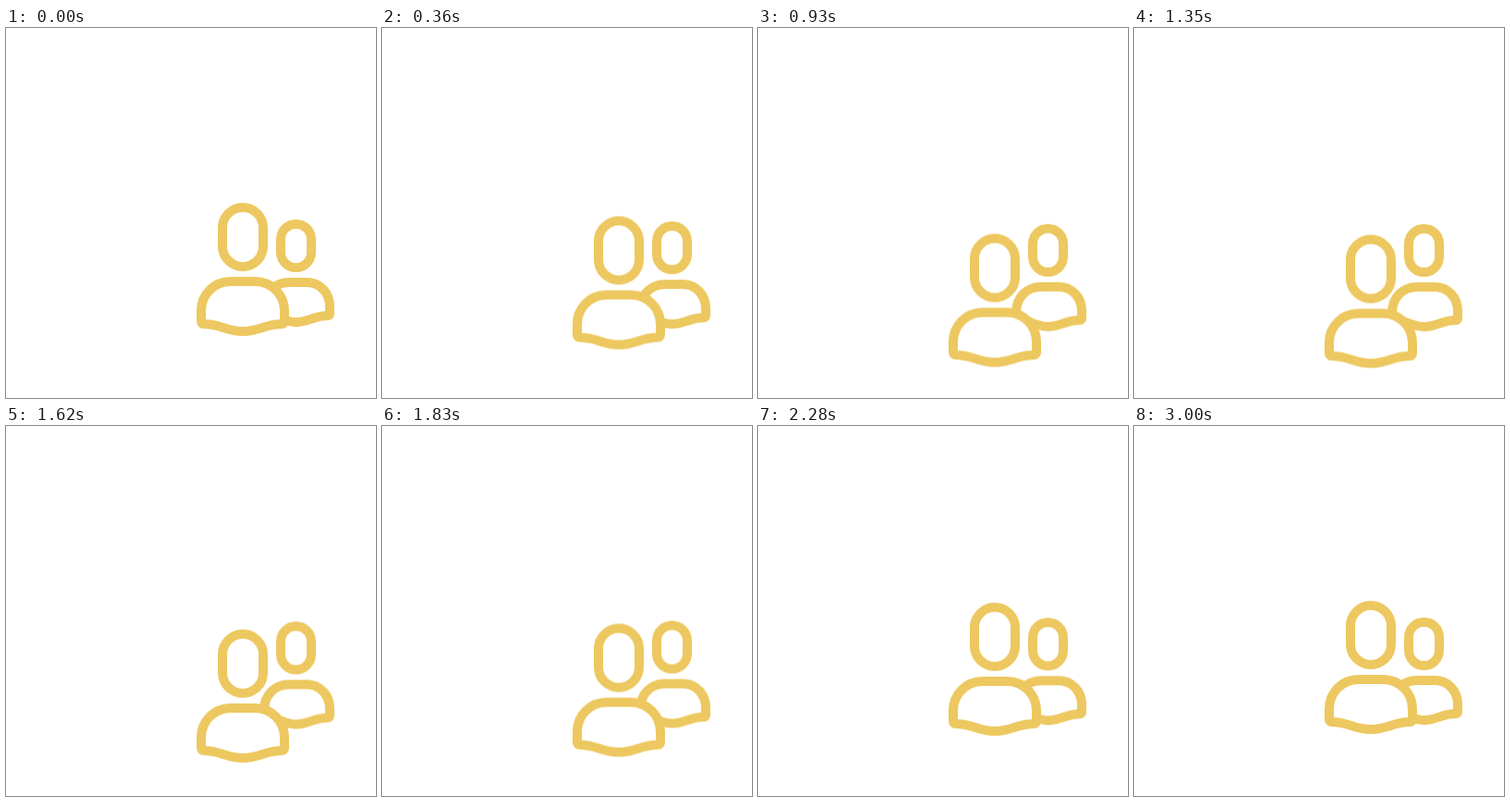
These frames come from a looping animation (400 by 400 pixels, 3.03 s). An HTML page:

```html
<!DOCTYPE html>
<html lang="en">
<head>
<meta charset="utf-8">
<title>Two people</title>
<style>
  html, body { margin: 0; width: 100%; height: 100%; overflow: hidden; background: #fff; }
  svg { display: block; width: 100%; height: 100%; }
  g { fill: #fff; stroke: #edc860; stroke-width: 10; stroke-linejoin: round; }
</style>
</head>
<body>
<svg viewBox="0 0 400 400">
  <g id="back">
    <rect x="297" y="212" width="33" height="47" rx="16.5"/>
    <path d="M279 303C279 287 290 275 306 275H325C340 275 350 287 350 301V309Q350 311 348 311C332 311 328 318 314 318S296 311 281 311Q279 311 279 309Z"/>
  </g>
  <g id="front">
    <rect x="234" y="194" width="44" height="64" rx="22"/>
    <path d="M211 306C211 288 225 274 243 274H269C287 274 301 288 301 306V317Q301 320 298 320C280 320 274 328 256 328S232 320 214 320Q211 320 211 317Z"/>
  </g>
</svg>
<script>
  const LOOP = 3030;
  const DOWN = 'cubic-bezier(.25, 0, .34, 1)';
  const UP = 'cubic-bezier(.66, 0, .75, 1)';

  // Sink by a distance, rise again, then rest until the loop ends.
  function bob(id, dist) {
    const steps = [
      [0, 0, DOWN],
      [1200, dist, UP],
      [2400, 0, 'linear'],
      [LOOP, 0, 'linear']
    ];
    document.getElementById(id).animate(
      steps.map(([t, y, easing]) => ({
        offset: t / LOOP,
        transform: `translateY(${y}px)`,
        easing
      })),
      { duration: LOOP, iterations: Infinity }
    );
  }

  bob('front', 35);
  bob('back', 5);
</script>
</body>
</html>
```
